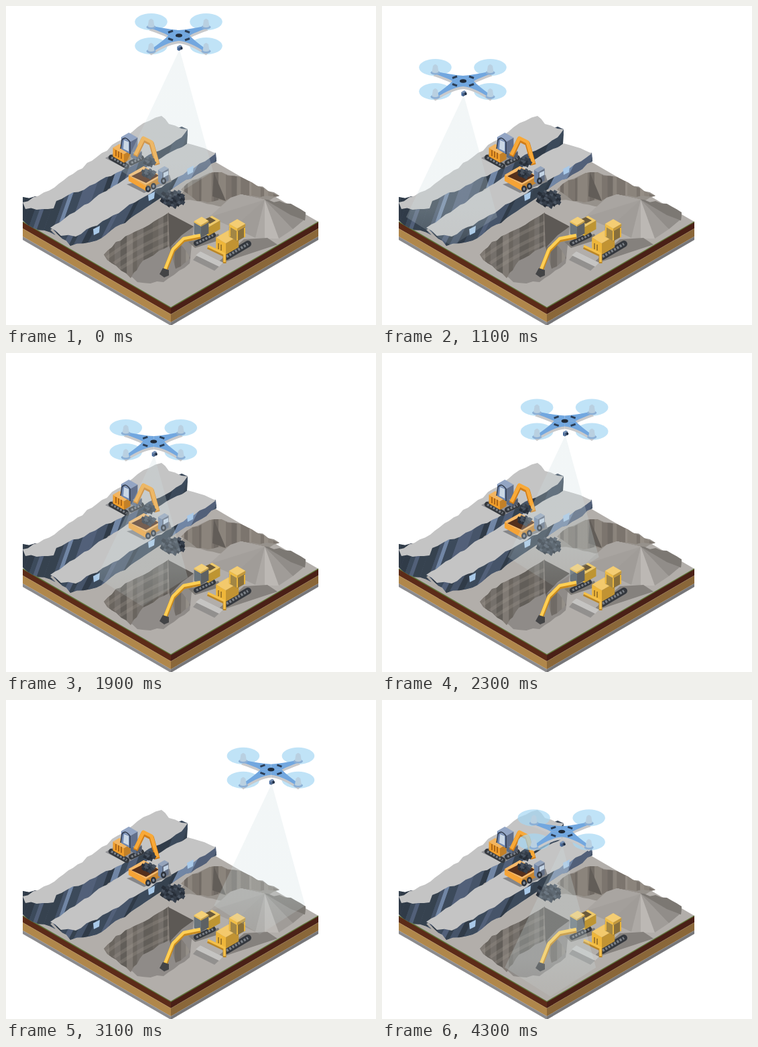
These frames come from a looping animation (552 px wide and 476 px high, 4400 ms). An HTML page:

```html
<!DOCTYPE html>
<html lang="en">
<head>
<meta charset="utf-8">
<title>Quarry survey drone</title>
<style>
  html, body { margin: 0; width: 100%; height: 100%; overflow: hidden; background: #fff; }
  svg { display: block; width: 100%; height: 100%; }
</style>
</head>
<body>
<svg id="stage" viewBox="0 0 552 476"></svg>
<script>
const LOOP = 4400, STEP = 100;

// Corners of the zigzag flight: time, x, y of the drone's hub.
const FLIGHT = [
  [0, 258, 44], [1100, 121, 112], [1600, 181, 155], [2700, 325, 71],
  [3200, 413, 112], [4400, 255, 204]
];

let seed = 23, clips = 0;
const random = () => (seed = seed * 16807 % 2147483647) / 2147483647;
const between = (a, b) => a + random() * (b - a);
const parse = keys => keys.split(' ').map(p => p.split(',').map(Number));

const poly = (points, fill, extra = '') => `<polygon points="${points}" fill="${fill}" ${extra}/>`;
const path = (d, fill, extra = '') => `<path d="${d}" fill="${fill}" ${extra}/>`;
const line = (d, color, width, extra = '') =>
  `<path d="${d}" fill="none" stroke="${color}" stroke-width="${width}" stroke-linejoin="round" ${extra}/>`;
const oval = (x, y, rx, ry, fill, extra = '') =>
  `<ellipse cx="${x}" cy="${y}" rx="${rx}" ry="${ry}" fill="${fill}" ${extra}/>`;
const clipped = (points, content) => {
  const id = 'clip' + clips++;
  return `<clipPath id="${id}"><polygon points="${points}"/></clipPath><g clip-path="url(#${id})">${content}</g>`;
};

// Closed outline through key points, broken into small uneven steps.
function ragged(keys, rough = 2) {
  const corners = parse(keys);
  return corners.flatMap(([x, y], i) => {
    const [nx, ny] = corners[(i + 1) % corners.length];
    const n = Math.max(1, Math.round(Math.hypot(nx - x, ny - y) / 9));
    return Array.from({ length: n }, (_, j) => {
      const wobble = j ? between(-rough, rough) : 0;
      return [x + (nx - x) * j / n, y + (ny - y) * j / n + wobble];
    });
  }).join(' ');
}

// Face filled with leaning facets that cycle unevenly through the shades.
function wall(keys, shades, width, lean = 0) {
  const points = ragged(keys), corners = parse(points);
  const xs = corners.map(p => p[0]), ys = corners.map(p => p[1]);
  const top = Math.min(...ys), bottom = Math.max(...ys), shift = lean * (bottom - top);
  let facets = poly(points, shades[0]), i = 0;
  for (let x = Math.min(...xs) - 10; x < Math.max(...xs) + shift; i++) {
    const w = width * between(.5, 1.5);
    facets += poly(`${x},${top} ${x + w + 1},${top} ${x + w - shift},${bottom} ${x - shift},${bottom}`,
      shades[(i + Math.floor(random() * 2)) % shades.length]);
    x += w;
  }
  return clipped(points, facets);
}

// Isometric box standing on its front corner: a runs right, b runs left.
function block(x, y, a, b, h, fill) {
  const at = (u, v, z) => `${x + (u - v) * .87},${y - (u + v) * .5 - z}`;
  const left = `${at(0, 0, 0)} ${at(0, b, 0)} ${at(0, b, h)} ${at(0, 0, h)}`;
  const right = `${at(0, 0, 0)} ${at(a, 0, 0)} ${at(a, 0, h)} ${at(0, 0, h)}`;
  const top = `${at(0, 0, h)} ${at(a, 0, h)} ${at(a, b, h)} ${at(0, b, h)}`;
  return [left, right, top].map(face => poly(face, fill)).join('') +
    poly(right, '#3a2a20', 'opacity=".25"') + poly(top, '#fff', 'opacity=".25"');
}

const track = (d, width) => line(d, '#34383e', width, 'stroke-linecap="round"') +
  line(d, '#7b8087', width * .4, 'stroke-dasharray="3 2"');

const boom = (d, width, light, dark) =>
  line(d, dark, width, 'transform="translate(0 2)"') + line(d, light, width * .7);

function lumps(x, y, rx, ry, count) {
  let out = oval(x, y, rx * .85, ry * .75, '#333b46');
  for (let i = 0; i < count; i++) {
    const turn = i * 2.4, far = Math.sqrt(i / count), r = between(2, 4);
    const cx = x + Math.cos(turn) * far * rx * .85, cy = y + Math.sin(turn) * far * ry * .85;
    out += poly(`${cx - r},${cy} ${cx - 1},${cy - r} ${cx + r},${cy - 1} ${cx + 1},${cy + r}`,
      ['#272e38', '#48525f', '#363f4b'][i % 3]);
  }
  return out;
}

function base() {
  const layers = [[0, 10, '#5c2b18', '#4a2016'], [10, 22, '#b0874b', '#8a6739'], [22, 27, '#8b8b8e', '#77777a']];
  const side = (x, from, to, fill) =>
    poly(`${x},${322 + from} 246,${450 + from} 246,${450 + to} ${x},${322 + to}`, fill);
  return poly('25,322 246,194 466,322 246,450', '#b2aeaa') +
    layers.map(([from, to, left, right]) => side(25, from, to, left) + side(466, from, to, right)).join('') +
    line('M25 322L246 450L466 322', '#5d7438', 1.4);
}

function backPit() {
  return poly(ragged('258,288 278,260 312,248 350,255 408,283 390,292 325,300'), '#96918b') +
    wall('261,274 278,260 312,248 350,255 408,284 350,282 326,291 285,291',
      ['#8b847c', '#7c756e', '#958e86', '#716b65'], 6) +
    poly('310,248 328,291 308,284', '#625d58');
}

// Spoil heap: a fan of flat facets falling away from the peak.
function mound() {
  const rim = parse('335,286 303,315 340,331 372,346 386,347 407,347 428,333 446,318');
  const tones = [169, 163, 160, 173, 188, 160, 145];
  return poly(ragged('383,288 425,295 447,308 446,320 405,310'), '#7c7873') +
    tones.map((v, i) => poly(`350,281 386,289 ${rim[i + 1]} ${rim[i]}`, `rgb(${v},${v - 4},${v - 8})`)).reverse().join('') +
    poly('386,289 420,301 447,308 446,320 425,312', '#7c7873');
}

function frontPit() {
  const layers = [14, 30, 44].map(dy =>
    line(`M150 ${362 + dy}Q190 ${332 + dy} 243 ${309 + dy}`, '#a39d95', 5, 'opacity=".25"')).join('');
  return poly(ragged('147,373 242,309 280,330 274,384 235,412 196,412'), '#8f8b88') +
    wall('146,371 164,352 192,337 243,308 244,358 204,380 186,406 151,379',
      ['#75706b', '#625e59', '#807a74', '#6a655f'], 7) +
    clipped('146,371 164,352 243,308 244,358 204,380 186,406', layers) +
    poly('242,309 280,329 262,342 244,361', '#5d5955') +
    wall('244,360 259,354 275,376 253,392', ['#827d78', '#959089', '#706b66'], 5);
}

function rocks() {
  const shades = ['#526079', '#36424f', '#465469', '#303b48', '#7186a5', '#3c4a5b'], top = '#c4c4c4';
  return wall('25,285 72,285 133,255 262,180 271,184 270,206 160,270 66,334 74,342 40,331 25,320', shades, 9, .35) +
    poly(ragged('25,293 72,271 128,231 196,181 232,164 243,176 271,184 262,196 205,228 133,265 75,291 71,302 29,303'), top) +
    wall('66,328 150,310 265,240 313,219 314,232 245,275 185,317 135,350 96,358', shades, 8, .5) +
    poly(ragged('66,331 95,311 160,269 271,205 313,220 289,235 240,264 176,303 104,344 82,343'), top) +
    [[275, 245], [217, 284], [135, 335]].map(([x, y]) =>
      poly(`${x - 5},${y - 2} ${x + 5},${y - 7} ${x + 4},${y + 3} ${x - 4},${y + 7}`, '#a9c9e8')).join('');
}

function orangeDigger() {
  const arm = 'M193 222L205 197L217 203L226 235';
  return poly('148,227 160,220 206,229 180,243', '#8f9094') +
    track('M187 234L202 227', 8) + track('M157 226L180 239', 8) +
    block(194, 230, 10, 10, 8, '#5b6b84') +
    block(176, 234, 11, 19, 13, '#ef9d2b') +
    line('M164 215v9M168 217v9M172 219v9', '#9d5a16', 1.6) +
    block(185, 221, 13, 15, 18, '#6f87b0') +
    poly('175,213 176,200 183,203 183,217', '#cbd8e6') +
    line('M171 213L173 200Q178 193 185 203V221', '#343f52', 1.6) +
    boom(arm, 7.5, '#f8a938', '#d17d18');
}

function truck() {
  return poly('180,266 206,279 247,262 244,252', '#858689') +
    block(209, 276, 26, 30, 9, '#f5a336') +
    poly('187,254 209,243 228,253 209,264', '#55301c') +
    lumps(212, 250, 11, 8, 14) +
    block(233, 266, 11, 7, 18, '#7186a6') +
    poly('235,256 242,252 242,246 235,249', '#c3d3e4') +
    [[212, 273], [220, 269], [235, 261]].map(([x, y]) =>
      oval(x, y, 4, 5, '#2c323b') + oval(x, y, 1.7, 2.3, '#7d8998')).join('') +
    lumps(214, 232, 10, 9, 12);
}

function yellowDigger() {
  const arm = 'M290 342L265 347L249 363L236 396';
  return poly('272,352 282,361 320,349 317,340', '#7d7a76') +
    track('M284 354L309 342', 8) +
    block(302, 343, 20, 14, 13, '#eab838') +
    poly('295,319 304,315 313,320 304,325', '#6a5a3c') +
    block(291, 346, 13, 12, 17, '#69737a') +
    block(291, 329, 13, 12, 2, '#f1c04b') +
    boom(arm, 6.5, '#ffcf55', '#c78a20') +
    poly('229,400 234,391 243,394 243,402 236,405', '#434446');
}

function bulldozer() {
  return poly('311,387 405,356 390,346 355,348', '#85817d') +
    track('M329 374L361 355', 10) +
    block(328, 371, 22, 17, 17, '#eeb63a') +
    line('M317 354v9M321 356v9', '#8f6c28', 1.6) +
    block(345, 351, 13, 14, 15, '#a28645') +
    line('M334 344V330M345 350V336M356 345V331', '#e9b53d', 2) +
    block(345, 336, 14, 14, 4, '#f0bd45') +
    boom('M301 358L326 370V382', 5, '#f4c04a', '#ba8628') +
    poly('279,379 290,366 324,383 311,395', '#92908e') +
    poly('283,372 290,366 324,383 318,389', '#c5c4c2');
}

function beam() {
  return `<linearGradient id="ray" y1="21" y2="246" x2="0" gradientUnits="userSpaceOnUse">
      <stop stop-color="#cfdee1" stop-opacity=".27"/>
      <stop offset=".75" stop-color="#cfdee1" stop-opacity=".27"/>
      <stop offset="1" stop-color="#cfdee1" stop-opacity=".12"/>
    </linearGradient>` + poly('1,21 51,203 -17,246 -85,203', 'url(#ray)');
}

// One corner of the airframe is described, then mirrored by the signs.
function drone() {
  const corners = [[-1, -1], [1, -1], [-1, 1], [1, 1]];
  const each = draw => corners.map(([sx, sy]) => draw(sx, sy, 41 * sx - .5, 18 * sy - 2.4)).join('');
  const arms = (fill, dy) => each((sx, sy, x, y) => {
    const end = y + 8;
    return path(`M0 0V${8 * sy}Q${16 * sx} ${9 * sy} ${x} ${end + 2 * sy}L${x + 3 * sx} ${end - sy}` +
      `Q${22 * sx} ${end * .3} ${16 * sx} 0Z`, fill, `transform="translate(0 ${dy})"`);
  });
  return each((sx, sy, x, y) => oval(x, y, 24.3, 12.6, '#a5d8f4', 'opacity=".7"')) +
    arms('#c8c9cb', 4) + arms('#72a7df', 0) +
    oval(0, 0, 5, 2.7, '#202b39') +
    each((sx, sy) => line(`M${9 * sx} ${7 * sy}L${16 * sx} ${4.5 * sy}`, '#2b3d55', 3)) +
    each((sx, sy, x, y) => oval(x, y + 8, 7, 3.2, '#8cb0d6') +
      path(`M${x - 5} ${y + 7}L${x - 3.5} ${y - 2}Q${x} ${y - 7} ${x + 3.5} ${y - 2}L${x + 5} ${y + 7}Q${x} ${y + 10} ${x - 5} ${y + 7}`,
        '#b9d0e1')) +
    block(0, 23, 5, 3, 5, '#456a9d') + oval(4, 19, 1.6, 2, '#1c2b40');
}

document.getElementById('stage').innerHTML =
  base() + backPit() + mound() + frontPit() + rocks() + lumps(249, 288, 21, 15, 34) +
  orangeDigger() + truck() + yellowDigger() + bulldozer() +
  `<g id="flyer">${beam()}${drone()}</g>`;

const flyer = document.getElementById('flyer');

function draw(now) {
  const t = Math.floor((now + .5) % LOOP / STEP) * STEP;
  const i = FLIGHT.findIndex(([end]) => end > t);
  const [t0, x0, y0] = FLIGHT[i - 1], [t1, x1, y1] = FLIGHT[i];
  const k = (t - t0) / (t1 - t0);
  flyer.setAttribute('transform', `translate(${x0 + (x1 - x0) * k} ${y0 + (y1 - y0) * k})`);
}

function tick() {
  draw(performance.now());
  requestAnimationFrame(tick);
}
tick();
</script>
</body>
</html>
```
